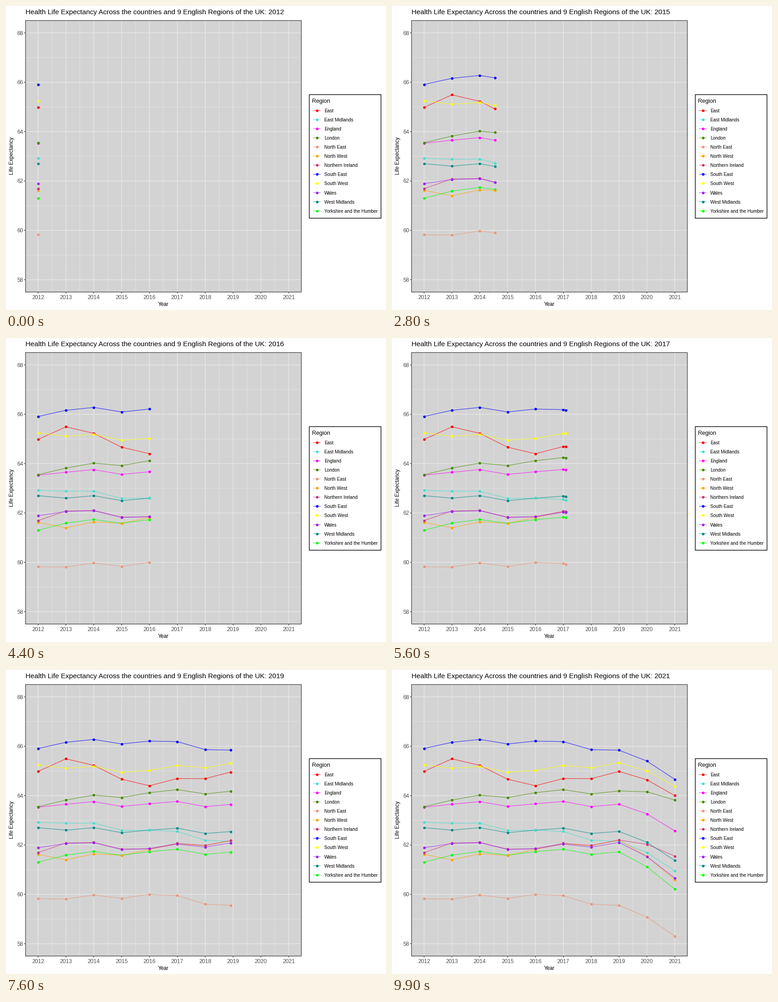
Recreate the animation shown at these times as a matplotlib script. Size 837 by 669 pixels, loop 10000 ms.

```python
import numpy as np
import matplotlib.pyplot as plt
from matplotlib.animation import FuncAnimation
from matplotlib.patches import Rectangle

plt.rcParams.update({"font.family": "Liberation Sans", "path.snap": False})

W, H, DPI = 837, 669, 72
STEPS = 11
FIRST, LAST = 2012, 2021
YEARS = np.arange(FIRST, LAST + 1)
LEFT, TOP, RIGHT, BOTTOM = 43, 32, 650.5, 629.5
DARK, GREY, GRID = "#333333", "#4d4d4d", "#ebebeb"
THIN = 1.2

# colour and gap to the national level in each key year
KEY_YEARS = [2012, 2013, 2016, 2019, 2021]
REGIONS = {
    "East": ("#ff0000", 1.43, 1.84, 0.75, 1.33, 1.37),
    "East Midlands": ("#40e0d0", -0.63, -0.77, -1.05, -1.51, -1.68),
    "England": ("#ff00ff", -0.02, 0, 0.02, 0, -0.06),
    "London": ("#458b00", 0, 0.17, 0.47, 0.54, 1.19),
    "North East": ("#e9967a", -3.73, -3.84, -3.65, -4.1, -4.32),
    "North West": ("#ffa500", -1.93, -2.25, -1.83, -1.45, -2.05),
    "Northern Ireland": ("#cd3278", -1.86, -1.57, -1.8, -1.45, -1.08),
    "South East": ("#0000ff", 2.36, 2.51, 2.56, 2.19, 2.03),
    "South West": ("#ffff00", 1.7, 1.46, 1.37, 1.68, 1.75),
    "Wales": ("#a020f0", -1.66, -1.59, -1.8, -1.55, -1.97),
    "West Midlands": ("#008b8b", -0.85, -1.05, -1.05, -1.1, -1.26),
    "Yorkshire and the Humber": ("#00ff00", -2.25, -2.06, -1.92, -1.93, -2.42),
}
# dots are stacked in this order, bottom first
STACK = ["England", "North East", "Yorkshire and the Humber", "West Midlands",
         "East Midlands", "North West", "East", "London", "South East",
         "South West", "Northern Ireland", "Wales"]


def national(year):
    """Rises for three years, falls back, and drops after 2019."""
    return 63.55 + 0.1 * ((year - FIRST) % 3) - 0.46 * np.maximum(year - 2019, 0)


def px(year):
    return LEFT + (year - 2011.55) * (RIGHT - LEFT) / 9.9


def py(value):
    return TOP + (68.5 - value) * (BOTTOM - TOP) / 11


fig = plt.figure(figsize=(W / DPI, H / DPI), dpi=DPI, facecolor="white")
ax = fig.add_axes([0, 0, 1, 1])
ax.set(xlim=(0, W), ylim=(H, 0))
ax.axis("off")


def line(x, y, color, lw, z, **kw):
    return ax.plot(x, y, color=color, lw=lw, zorder=z, solid_capstyle="butt", **kw)[0]


def dot(x, y, color, z):
    return ax.plot(x, y, "o", color=color, ms=5.8, mew=0, zorder=z)[0]


def label(x, y, text, size, color="black", **kw):
    return ax.text(x, y, text, fontsize=size, color=color, **kw)


def draw_panel():
    box = (LEFT, TOP), RIGHT - LEFT, BOTTOM - TOP
    ax.add_patch(Rectangle(*box, fc="#d3d3d3", ec="none", zorder=0))
    ax.add_patch(Rectangle(*box, fc="none", ec=DARK, lw=THIN, zorder=6))
    for v in range(58, 69):
        y, major = py(v), v % 2 == 0
        line([LEFT, RIGHT], [y, y], GRID, THIN if major else THIN / 2, 1)
        if major:
            line([LEFT - 3.2, LEFT], [y, y], DARK, THIN, 1)
            label(37.7, y + 4.4, v, 12.1, GREY, ha="right")
    for year in YEARS:
        x, mid = px(year), px(year + 0.5)
        line([x, x], [TOP, BOTTOM], GRID, THIN, 1)
        line([x, x], [BOTTOM, BOTTOM + 3.2], DARK, THIN, 1)
        label(x, 644.6, year, 12.1, GREY, ha="center")
        if year < LAST:
            line([mid, mid], [TOP, BOTTOM], GRID, THIN / 2, 1)
    label(347, 660, "Year", 11.7, ha="center")
    label(12.6, 329.5, "Life Expectancy", 11.7, rotation=90, ha="center", va="center")


def draw_legend():
    ax.add_patch(Rectangle((668, 195), 158, 272, fc="white", ec="black", lw=1.4))
    label(674.5, 212.6, "Region", 12.6)
    for i, (name, (color, *_)) in enumerate(REGIONS.items()):
        y = 230 + 20.06 * i
        line([676.4, 692.8], [y, y], color, 1.4, 3, alpha=0.6)
        dot([684.6], [y], color, 4)
        label(701, y + 4, name, 10.12)


draw_panel()
draw_legend()
title = label(43, 18.4, "", 15.35)

series = []
for i, (name, (color, *gaps)) in enumerate(REGIONS.items()):
    values = national(YEARS) + np.interp(YEARS, KEY_YEARS, gaps)
    path = line([], [], color, 1.5, 3 + i / 100, alpha=0.6)
    dots = dot([], [], color, 4 + STACK.index(name) / 100)
    series.append((values, path, dots))


def update(n):
    now = FIRST + n / STEPS
    # all years passed so far, then the moving head
    t = np.append(YEARS[:n // STEPS + 1], now)
    if n % STEPS == 0:
        t = t[:-1]
    for values, path, dots in series:
        y = py(np.interp(t, YEARS, values))
        path.set_data(px(t), y)
        dots.set_data(px(t), y)
    title.set_text("Health Life Expectancy Across the countries and 9 English "
                   f"Regions of the UK: {int(now + 0.5)}")


anim = FuncAnimation(fig, update, frames=STEPS * (LAST - FIRST) + 1,
                     interval=100, repeat=True, repeat_delay=0)
plt.show()
```
